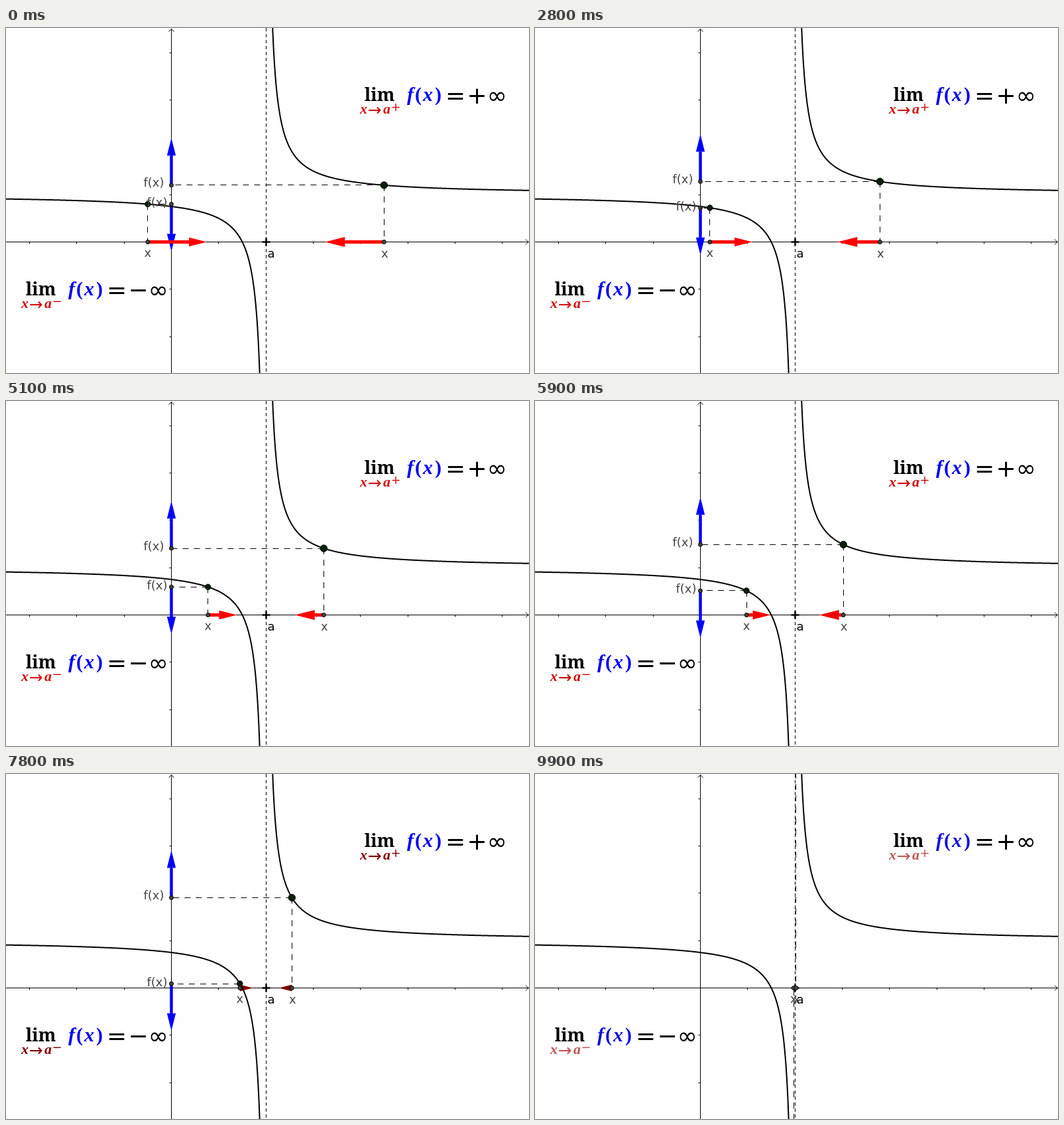
These frames come from a looping animation (789 by 520 pixels, 10000 ms). An HTML page with a canvas:

```html
<!DOCTYPE html>
<html lang="en">
<head>
<meta charset="utf-8">
<title>One-sided limits</title>
<style>
  html, body { margin: 0; width: 100%; height: 100%; overflow: hidden; background: #fff; }
  canvas { display: block; }
</style>
</head>
<body>
<canvas id="stage" width="789" height="520"></canvas>
<script>
const W = 789, H = 520, UNIT = 71.3, OX = 249.5, OY = 322.5, A = 2;
const LABEL = '18px "DejaVu Sans", sans-serif';
const SERIF = '"Liberation Serif", serif';
const SYMBOL = '"DejaVu Sans", sans-serif';
const c = document.getElementById('stage').getContext('2d');

const f = x => 1 + 0.5 / (x - A);
const px = x => OX + x * UNIT;
const py = y => OY - y * UNIT;
const crisp = v => Math.floor(v) + 0.5;

// Reds darken as x nears a: [step, r, g, b]
const ARROW_RED = [[0, 255, 0, 0], [51, 255, 0, 0], [67, 230, 0, 0], [78, 128, 0, 0], [99, 184, 80, 80]];
const TEXT_RED = [[0, 210, 16, 16], [51, 210, 16, 16], [67, 196, 0, 0], [78, 128, 0, 0], [99, 190, 84, 84]];

function ramp(keys, step) {
  const n = Math.max(1, keys.findIndex(k => k[0] >= step));
  const from = keys[n - 1], to = keys[n];
  const p = (step - from[0]) / (to[0] - from[0]);
  return `rgb(${[1, 2, 3].map(j => Math.round(from[j] + (to[j] - from[j]) * p))})`;
}

function line(points, width = 1, dash = [], color = '#000') {
  c.beginPath();
  points.forEach(([x, y]) => c.lineTo(x, y));
  c.lineWidth = width;
  c.strokeStyle = color;
  c.setLineDash(dash);
  c.stroke();
}

function text(str, x, y, font, color, align = 'left') {
  c.font = font;
  c.fillStyle = color;
  c.textAlign = align;
  c.fillText(str, x, y);
}

function dot(x, y, r, fill) {
  c.beginPath();
  c.arc(x, y, r, 0, 7);
  c.fillStyle = fill;
  c.fill();
  c.lineWidth = 1;
  c.strokeStyle = '#000';
  c.setLineDash([]);
  c.stroke();
}

function arrow(x, y, angle, length, head, width, color) {
  head = Math.min(head, length);
  c.save();
  c.translate(x, y);
  c.rotate(angle);
  if (length > head) line([[0, 0], [length - head, 0]], width, [], color);
  c.beginPath();
  c.moveTo(length, 0);
  c.lineTo(length - head, -head / 4);
  c.lineTo(length - head, head / 4);
  c.fillStyle = color;
  c.fill();
  c.restore();
}

function axes() {
  line([[0, OY], [W, OY]]);
  line([[OX, 1], [OX, H]]);
  line([[W - 5, OY - 4], [W - 1, OY], [W - 5, OY + 4]]);
  line([[OX - 4, 5.5], [OX, 1.5], [OX + 4, 5.5]]);
  for (let n = -3; n <= 7; n++) {
    const x = crisp(px(n)), y = crisp(py(n));
    if (n) {
      line([[x, OY], [x, OY + 3]]);
      line([[OX - 3, y], [OX, y]]);
    }
  }
}

function branch(from, to) {
  const points = [];
  for (let x = from; x <= to; x += 0.5) {
    const y = py(f((x - OX) / UNIT));
    points.push([x, y]);
  }
  line(points, 2);
}

function formula(dx, dy, sign, red, blue) {
  const bold = `bold 30px ${SERIF}`, sub = `italic bold 22px ${SERIF}`;
  c.save();
  c.translate(dx, dy);
  text('lim', 563.5, 110, 'bold 27px "Noto Serif", serif', '#000', 'center');
  text('f', 605, 110, 'italic ' + bold, blue);
  text('(', 617, 110, bold, blue);
  text('x', 629, 110, 'italic ' + bold, blue);
  text(')', 647, 110, bold, blue);
  text('=', 663, 114, '36px ' + SYMBOL, '#000');
  text(sign + '∞', 695.5, 114, '36px ' + SYMBOL, '#000');
  text('x', 534, 129, sub, red);
  text('→', 545.5, 132, '25px ' + SYMBOL, red);
  text('a', 569, 129, sub, red);
  text(sign, 580.5, 125, '18px ' + SYMBOL, red);
  c.restore();
}

function draw(step) {
  const gap = 2.5 * (1 - step / 100);
  const red = ramp(ARROW_RED, step), textRed = ramp(TEXT_RED, step);
  const sides = [
    { dir: -1, r: 4.2, head: 27, labelX: 212.5, labelY: 3.5, nameX: 0, nameY: 344.5 },
    { dir: 1, r: 5.2, head: 30, labelX: 207.5, labelY: 2.5, nameX: 1, nameY: 346 }
  ];
  for (const s of sides) {
    const x = A + s.dir * gap;
    s.x = px(x);
    s.y = py(f(x));
  }

  c.fillStyle = '#fff';
  c.fillRect(0, 0, W, H);
  axes();
  line([[392.5, 0], [392.5, H]], 1, [5, 4]);

  for (const { x, y } of sides) {
    line([[crisp(x), y], [crisp(x), OY]], 1, [9, 8]);
    line([[x, crisp(y)], [OX, crisp(y)]], 1, [9, 8]);
  }
  for (const s of sides) arrow(OX, s.y, -s.dir * Math.PI / 2, UNIT, 26.5, 4.5, step < 90 ? '#00f' : '#1212e0');
  for (const s of sides) arrow(s.x, OY, s.dir > 0 ? Math.PI : 0, gap * UNIT / 2, s.head, 5, red);

  branch(0, 385);
  branch(401, W);
  line([[386.5, OY], [398.5, OY]], 2.5);
  line([[392.5, OY - 6], [392.5, OY + 6]], 2.5);

  for (const s of sides) {
    dot(s.x, s.y, s.r, '#0a200a');
    dot(s.x, OY, 3, '#444');
    dot(OX, s.y, 3, '#444');
    text('f(x)', s.labelX, s.y + s.labelY, LABEL, '#444');
    text('x', s.x + s.nameX, s.nameY, LABEL, '#444', 'center');
  }
  text('a', 394.5, 346, LABEL, '#000');
  const blue = step < 90 ? '#0000f0' : '#1212d8';
  formula(0, 0, '+', textRed, blue);
  formula(-511, 293, '−', textRed, blue);
}

function tick() {
  draw(Math.floor(performance.now() / 100) % 100);
  requestAnimationFrame(tick);
}
tick();
</script>
</body>
</html>
```
